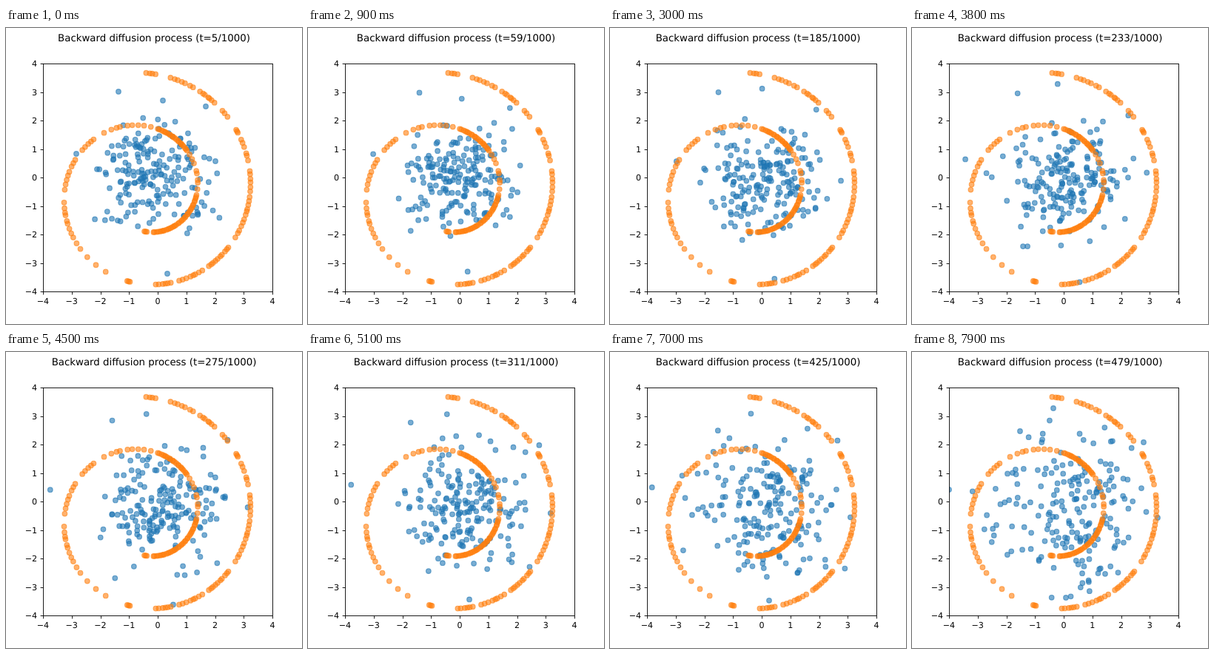
An HTML page for the animation above (8 s loop, 400 by 400 pixels).

```html
<!DOCTYPE html>
<html lang="en">
<head>
<meta charset="utf-8">
<title>Backward diffusion</title>
<style>
  html, body { margin: 0; width: 100%; height: 100%; overflow: hidden; background: #fff; }
  svg { display: block; width: 400px; height: 400px; }
  text { font-family: "DejaVu Sans", Verdana, sans-serif; font-size: 11.11px; fill: #000;
         text-rendering: geometricPrecision; }
  #title { font-size: 13.33px; text-anchor: middle; }
  #axes { stroke: #000; stroke-width: .89; fill: none; }
  circle { fill-opacity: .6; stroke-opacity: .6; stroke-width: 1.11; }
  #cloud circle { fill: #1f77b4; stroke: #1f77b4; }
  #spiral circle { fill: #ff7f0e; stroke: #ff7f0e; }
</style>
</head>
<body>
<svg viewBox="0 0 400 400">
  <clipPath id="plot"><rect x="50" y="48" width="310" height="308"/></clipPath>
  <g clip-path="url(#plot)"><g id="cloud"></g><g id="spiral"></g></g>
  <g id="axes"><rect x="50.5" y="48.5" width="310" height="308"/></g>
  <g id="labels"></g>
  <text id="title" x="200" y="18"></text>
</svg>
<script>
const STEP = 100, STEPS = 80, COUNT = 190;
const $ = id => document.getElementById(id);

function add(parent, tag, attrs, text) {
  const node = document.createElementNS("http://www.w3.org/2000/svg", tag);
  for (const name in attrs) node.setAttribute(name, attrs[name]);
  if (text !== undefined) node.textContent = text;
  parent.appendChild(node);
  return node;
}
const dot = (parent, x = 0, y = 0) => add(parent, "circle", { cx: x, cy: y, r: 3.33 });

// Seeded random numbers
let seed = 20;
function random() {
  seed = (seed + 0x6D2B79F5) | 0;
  let h = Math.imul(seed ^ (seed >>> 15), 1 | seed);
  h = (h + Math.imul(h ^ (h >>> 7), 61 | h)) ^ h;
  return ((h ^ (h >>> 14)) >>> 0) / 4294967296;
}
const gauss = () => Math.sqrt(-2 * Math.log(1 - random())) * Math.cos(2 * Math.PI * random());

// Axes
for (let v = -4; v <= 4; v++) {
  const x = 205 + v * 38.75, y = 202 - v * 38.5;
  const px = Math.round(x) + .5, py = Math.round(y) + .5;
  const label = String(v).replace("-", "\u2212");
  add($("axes"), "path", { d: `M${px} 356.5v3.9M50.5 ${py}h-3.9` });
  add($("labels"), "text", { x, y: 372.5, "text-anchor": "middle" }, label);
  add($("labels"), "text", { x: 42.2, y: y + 4.2, "text-anchor": "end" }, label);
}

// Target roll: an Archimedean spiral, filled in stretches with gaps between them
const spiralAt = a => [186.6 + 11.41 * a * Math.cos(a), 221.2 - 11.365 * a * Math.sin(a)];
const stretches = [ // from angle, to angle, number of points
  [14.12, 14.04, 4], [13.91, 13.7, 7], [13.63, 13.47, 7], [13.37, 13.3, 3],
  [13.16, 13.13, 3], [13.06, 12.86, 6], [12.76, 12.1, 18], [11.98, 11.71, 10],
  [11.63, 11.37, 8], [11.28, 11.12, 6], [10.84, 10.81, 3], [10.55, 10.08, 5],
  [10, 9.56, 9], [9.4, 8.99, 8], [8.83, 8.62, 5], [8.45, 7.75, 9],
  [7.64, 7.05, 22], [6.97, 6.33, 8], [6.22, 4.94, 36], [4.78, 4.72, 3]
];
const angles = stretches.flatMap(([from, to, n]) => {
  const gap = (to - from) / (n - 1);
  return Array.from({ length: n }, (_, i) =>
    from + gap * (i + (i % (n - 1) ? .7 * (random() - .5) : 0)));
});
angles.forEach(a => dot($("spiral"), ...spiralAt(a)));

// Noise that slowly forgets its past, one value per step
function noiseWalk() {
  const keep = .95, kick = Math.sqrt(1 - keep * keep);
  const walk = [gauss()];
  while (walk.length < STEPS) walk.push(keep * walk[walk.length - 1] + kick * gauss());
  return walk.map(v => 2.5 * Math.tanh(v / 2.3));
}

// Each point is noise at first and is pulled more and more towards its place on the roll
function cloudPoint() {
  const [tx, ty] = spiralAt(angles[Math.floor(random() * angles.length)]);
  const nx = noiseWalk(), ny = noiseWalk();
  return p => {
    const k = Math.round(p * (STEPS - 1));
    const pull = .06 + .5 * p, spread = 1 - .25 * p;
    return [205 + pull * (tx - 205) + spread * 38.75 * nx[k],
            202 + pull * (ty - 202) + spread * 38.5 * ny[k]];
  };
}

// Outlying points drift from one place to another
const drifts = [
  [[218, 332], [208, 332]], [[152, 86], [146, 107]], [[283, 180], [332, 224]],
  [[95, 170], [50, 186]], [[270, 106], [313, 122]], [[212, 98], [191, 76]]
];
function driftPoint([start, end]) {
  const noise = [noiseWalk(), noiseWalk()];
  return p => start.map((s, c) =>
    s + (end[c] - s) * p + 8 * noise[c][Math.round(p * (STEPS - 1))] * Math.sin(Math.PI * p));
}

const points = [...Array.from({ length: COUNT }, cloudPoint), ...drifts.map(driftPoint)]
  .map(place => ({ place, node: dot($("cloud")) }));

let shown = -1;
function draw(k) {
  if (k === shown) return;
  shown = k;
  $("title").textContent = `Backward diffusion process (t=${5 + 6 * k}/1000)`;
  for (const { place, node } of points) {
    const [x, y] = place(k / (STEPS - 1));
    node.setAttribute("cx", x.toFixed(2));
    node.setAttribute("cy", y.toFixed(2));
  }
}

function tick() {
  draw(Math.floor(performance.now() / STEP) % STEPS);
  requestAnimationFrame(tick);
}
tick();
</script>
</body>
</html>
```
